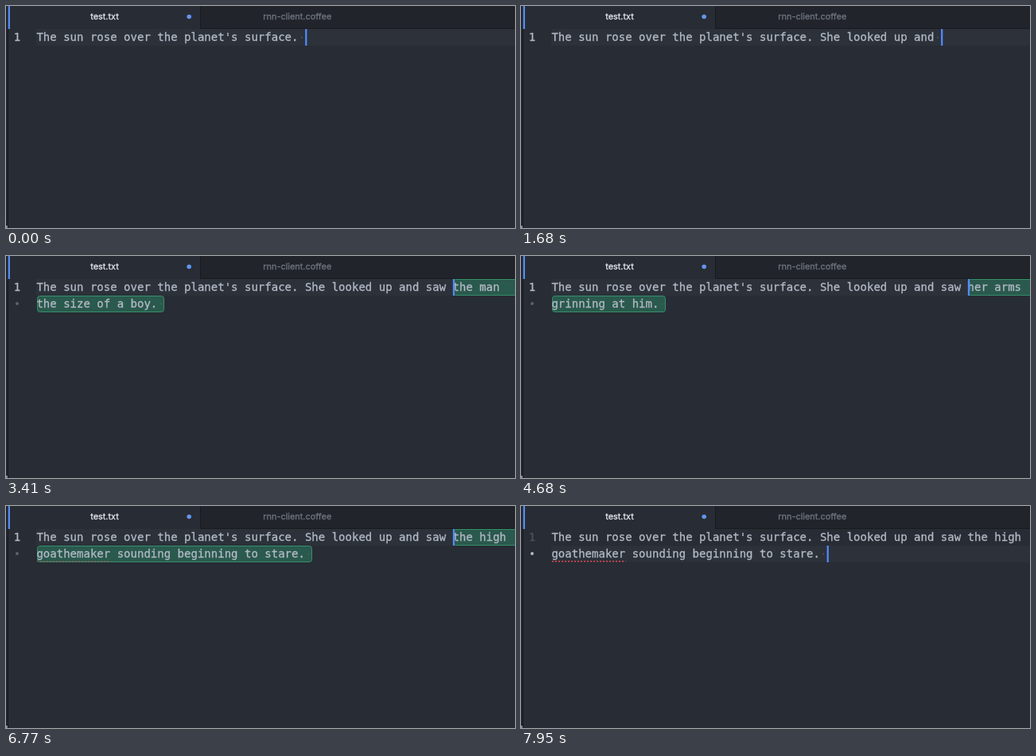
These frames come from a looping animation (640x280 px, 8 s). An HTML page:

```html
<!DOCTYPE html>
<html lang="en">
<head>
<meta charset="utf-8">
<title>Editor suggestions</title>
<style>
  html, body { margin: 0; width: 100%; height: 100%; overflow: hidden; background: #282c34; }
  svg { display: block; width: 640px; height: 280px; }
  text { stroke: currentColor; fill: currentColor; stroke-width: .3; }
  .code { font: 14.02px "DejaVu Sans Mono", monospace; color: #b3bac6; white-space: pre; }
  .tab { font: 10.9px Inter, sans-serif; text-anchor: middle; }
  .box { fill: #2a594d; stroke: #349069; }
  .arc { fill: none; stroke: #8eabe6; stroke-width: 1.3; stroke-linecap: round; }
</style>
</head>
<body>
<svg viewBox="0 0 640 280">
  <rect width="640" height="280" fill="#282c34"/>
  <rect x="244" width="396" height="29" fill="#21252b"/>
  <path d="M244.5 0V28.5H640" fill="none" stroke="#181a1f"/>
  <rect width="2" height="280" fill="#21252b"/>
  <rect x="2" width="1" height="280" fill="#181a1f"/>
  <rect y="277" width="2" height="3" fill="#858a92"/>
  <rect x="2.6" width="2.4" height="29" fill="#568af2"/>
  <text class="tab" x="124" y="17" color="#e6e9ef">test.txt</text>
  <text class="tab" x="366.3" y="17" color="#6e747f">rnn-client.coffee</text>
  <circle cx="230.2" cy="13.5" r="2.8" fill="#6494ed"/>

  <rect id="highlight" x="38" width="602" height="21" fill="#2c313a"/>
  <g id="boxes">
    <rect class="box" x="562.5" y="29.5" width="90" height="20" rx="3"/>
    <rect class="box" id="box" x="39.5" y="50.5" height="20" rx="3"/>
  </g>
  <path id="misspelt" d="M39 69.7H131.5" stroke="#e0474c" stroke-width="1.6" stroke-dasharray="2 2"/>
  <text class="code" id="number" x="9.8" y="44">1</text>
  <circle id="bullet" cx="14" cy="60" r="2"/>
  <text class="code" id="line1" x="38.4" y="44"></text>
  <text class="code" id="line2" x="38.4" y="65"></text>
  <circle id="space" r=".9" fill="#525a68"/>
  <g id="spinner">
    <path class="arc" d="M583.2 37.4Q587.6 42 583.2 46.6"/>
    <circle cx="578" cy="42" r="1.7" fill="#6597f5"/>
  </g>
  <rect id="cursor" width="2.2" height="21" fill="#528bff"/>
</svg>
<script>
const LOOP = 8000, LEFT = 38.6, PITCH = 8.44, ROW = 21, TOP = 29;
const START = "The sun rose over the planet's surface. ";
const TYPED = "She looked up and saw ";
const KEY_TIMES = [150, 250, 340, 430, 520, 610, 700, 790, 865, 945, 1080,
  1150, 1225, 1300, 1385, 1460, 1540, 1620, 1715, 1800, 1880, 1970];
const SUGGESTIONS = [
  { at: 3350, head: "the man", tail: "the size of a boy. " },
  { at: 4550, head: "her arms", tail: "grinning at him. " },
  { at: 5970, head: "the high", tail: "goathemaker sounding beginning to stare. " }
];
const SPIN_START = 2200, SPIN_PHASE = 2500, SPIN_PERIOD = 1200;
const ACCEPT = 7600, BLINK = 800;

const el = {};
document.querySelectorAll("[id]").forEach(node => el[node.id] = node);

const set = (node, attrs) => {
  for (const name in attrs) node.setAttribute(name, attrs[name]);
};
const show = (node, on) => set(node, { visibility: on ? "visible" : "hidden" });
const columnX = column => LEFT + column * PITCH;

function spinAngle(t) {
  const p = ((t - SPIN_PHASE) / SPIN_PERIOD % 1 + 1) % 1;
  const eased = p < .5 ? 4 * p ** 3 : 1 - 4 * (1 - p) ** 3;
  return eased * 360;
}

function render(t) {
  const count = KEY_TIMES.filter(time => time <= t).length;
  const prefix = START + TYPED.slice(0, count);
  const suggestion = SUGGESTIONS.filter(s => s.at <= t).pop();
  const accepted = t >= ACCEPT;
  const pending = suggestion && !accepted;
  const head = suggestion ? suggestion.head : "";
  const tail = suggestion ? suggestion.tail : "";
  const row = accepted ? 1 : 0;

  el.line1.textContent = prefix + head;
  el.line2.textContent = tail;
  set(el.highlight, { y: TOP + row * ROW });
  el.number.style.color = accepted ? "#495162" : "#b3bac6";
  set(el.bullet, { fill: accepted ? "#b3bac6" : "#5a6271" });
  show(el.bullet, suggestion);

  show(el.boxes, pending);
  set(el.box, { width: Math.max(0, Math.round(tail.length * PITCH) - 1) });
  show(el.misspelt, tail.startsWith("goathemaker"));
  set(el.misspelt, { opacity: accepted ? 1 : .45 });

  const last = tail || prefix;
  show(el.space, last.endsWith(" "));
  set(el.space, { cx: columnX(last.length - .5), cy: tail ? 60.5 : 39.5 });

  show(el.spinner, t >= SPIN_START && !suggestion);
  set(el.spinner, { transform: `rotate(${spinAngle(t)} 581 42)` });

  const column = accepted ? tail.length : prefix.length;
  const touched = accepted ? ACCEPT : count ? KEY_TIMES[count - 1] : 0;
  show(el.cursor, pending || (t - touched) % BLINK < BLINK / 2);
  set(el.cursor, { x: columnX(column), y: TOP + row * ROW });
}

function frame() {
  render(performance.now() % LOOP);
  requestAnimationFrame(frame);
}
frame();
</script>
</body>
</html>
```
